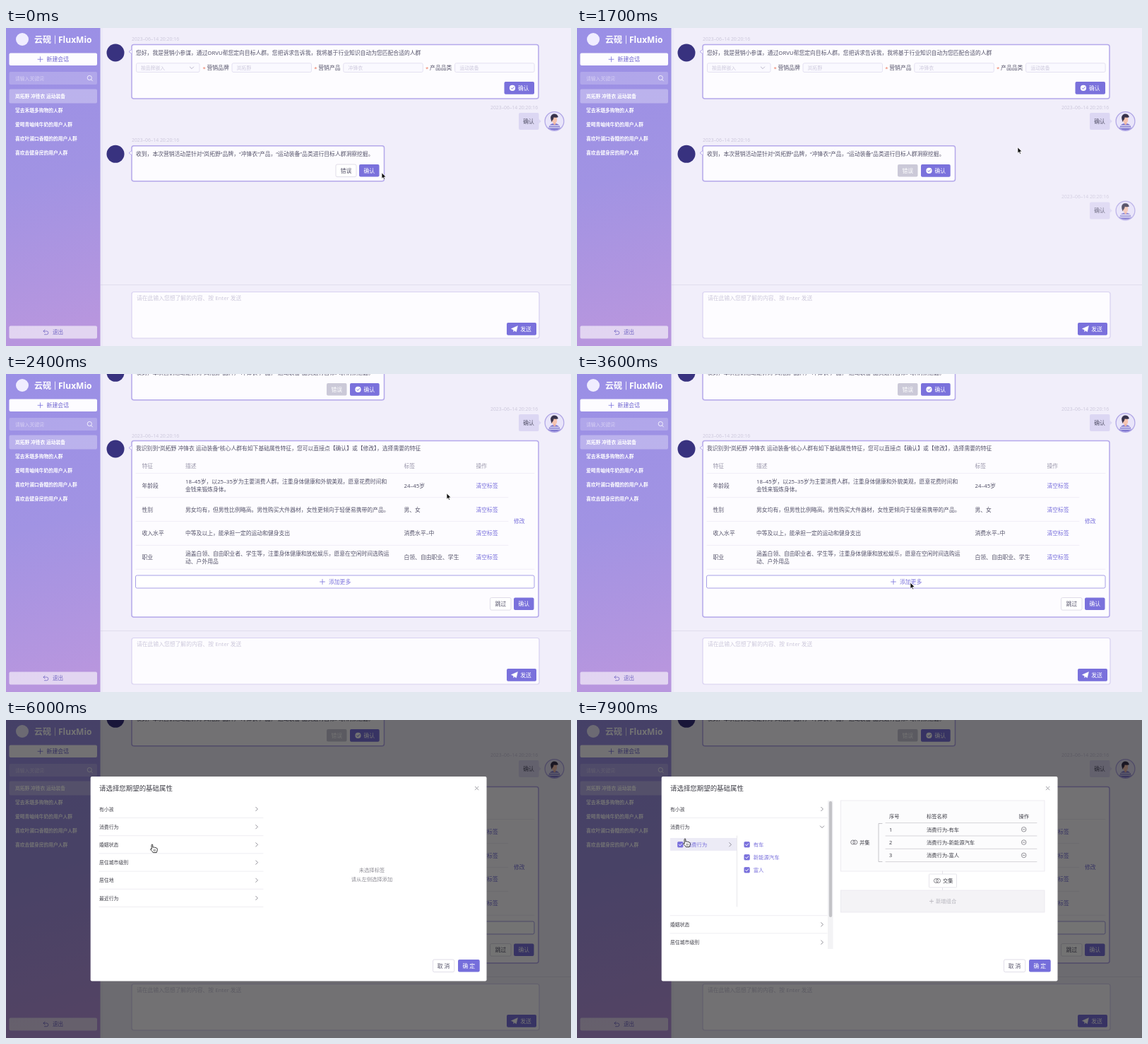
An HTML page that plays this animation: 800x450 px, repeating every 8000 ms.

```html
<!DOCTYPE html>
<html lang="zh-CN">
<head>
<meta charset="utf-8">
<title>会话</title>
<style>
html, body { margin: 0; height: 100%; overflow: hidden; background: #f1eefa; }
svg { display: block; width: 100vw; height: 100vh; font-family: "Noto Sans", "Noto Sans CJK SC", "Noto Sans CJK", sans-serif; }
</style>
</head>
<body>
<svg id="stage" viewBox="0 0 800 450"></svg>
<script>
const INK = '#55536a', PURPLE = '#7a71dc', PALE = '#cdc9dc', DARK = '#3f3f48';
const BRAND = '岚拓野';

// Drawing helpers; text y is the vertical centre of the line
const text = (x, y, s, size = 7.8, fill = INK, extra = '') =>
  `<text x="${x}" y="${y + size * .37}" font-size="${size}" fill="${fill}" ${extra}>${s}</text>`;
const mid = (x, y, s, size, fill, extra = '') => text(x, y, s, size, fill, `text-anchor="middle" ${extra}`);
const rect = (x, y, x2, y2, fill, stroke = 'none', r = 2, w = .8) =>
  `<rect x="${x}" y="${y}" width="${x2 - x}" height="${y2 - y}" rx="${r}" fill="${fill}" stroke="${stroke}" stroke-width="${w}"/>`;
const path = (d, stroke, w = .8, fill = 'none') =>
  `<path d="${d}" fill="${fill}" stroke="${stroke}" stroke-width="${w}" stroke-linecap="round" stroke-linejoin="round"/>`;
const circle = (x, y, r, fill, stroke = 'none', w = .8) =>
  `<circle cx="${x}" cy="${y}" r="${r}" fill="${fill}" stroke="${stroke}" stroke-width="${w}"/>`;
const group = (id, s, extra = '') => `<g id="${id}" ${extra}>${s}</g>`;
const hline = (x, y, x2, color, w = .7) => path(`M${x} ${y}H${x2}`, color, w);
const plus = (x, y, color, r = 3.5) => path(`M${x - r} ${y}h${2 * r}M${x} ${y - r}v${2 * r}`, color);
const chevron = (x, y, color = '#77757f', turn = 0) =>
  `<g transform="translate(${x} ${y}) rotate(${turn})">${path('M-1.3 -2.7L1.4 0L-1.3 2.7', color)}</g>`;

const button = (x, y, x2, label, fill = PURPLE, color = '#fff', stroke = 'none') =>
  rect(x, y, x2, y + 17.6, fill, stroke) + mid((x + x2) / 2, y + 8.8, label, 7.8, color);
const plain = (x, y, x2, label) => button(x, y, x2, label, '#fff', INK, '#d8d5e3');
const checked = (x, y, x2) => rect(x, y, x2, y + 17.8, PURPLE) + circle(x + 11.5, y + 8.9, 4.1, '#fff') +
  path(`M${x + 9.7} ${y + 9}l1.4 1.4l2.5 -2.8`, PURPLE, 1) + text(x + 19.5, y + 8.9, '确认', 7.8, '#fff');
const tick = (x, y, on) => rect(x - 3.7, y - 3.7, x + 3.7, y + 3.7, on ? PURPLE : '#fff', on ? PURPLE : '#cfcfd6', 1) +
  (on ? path(`M${x - 1.9} ${y}l1.5 1.6l2.5 -3`, '#fff', 1) : '');
const rings = (x, y) => circle(x - 1.6, y, 3, 'none', '#66656d') + circle(x + 1.6, y, 3, 'none', '#66656d');

const stamp = (x, y) => text(x, y, '2023–06–14 20:20:16', 6.85, PALE);
const card = (x2, y, y2) => circle(155, y + 11.5, 12.5, '#38327f') +
  rect(178, y, x2, y2, '#fdfcff', '#b4a8ea', 3, 1.5) +
  path(`M178 ${y + 7}l-4 3l4 3`, '#b4a8ea', 1, '#fdfcff');

const user = y => `<g transform="translate(776.5 ${y})">` + circle(0, 0, 13.4, '#e9e5fa', '#b1a7e6', 1.3) +
  path('M-8 10Q-7 3 0 3Q7 3 8 10Q0 15 -8 10Z', '#8078cf', .4, '#8078cf') +
  path('M-6 6.2H6M-7 9H7', '#fff', 1.1) +
  rect(-1.6, 0, 2, 5, '#efb6a1') + rect(-3.6, -7.5, 3.6, 2, '#f6c4b0', 'none', 3.2) +
  path('M-4 0Q-7 -8 -2 -10Q4 -11 5 -6Q2 -5 -1 -6Q-1 -3 -4 0Z', '#37324c', .5, '#37324c') + '</g>';
const reply = y => stamp(686, y - 19.5) + rect(726, y - 12, 754.5, y + 12, '#dcd7f3') +
  path(`M754.5 ${y - 3}l3 3l-3 3Z`, '#dcd7f3', .3, '#dcd7f3') + mid(740, y, '确认') + user(y);

function sidebar() {
  const items = [`${BRAND} 冲锋衣 运动装备`, '常去禾璐多购物的人群', '爱喝青岫纯牛奶的用户人群',
    '喜欢叶澜口香糖的的用户人群', '喜欢去健身房的用户人群'];
  return rect(0, 0, 133.5, 450, 'url(#side)', 'none', 0) + rect(133.5, 0, 137, 450, '#5a4a9008', 'none', 0) +
    circle(23, 16, 9, '#f0edff') + text(40, 16.3, '云砚', 12, '#fff', 'font-weight="600"') +
    path('M69.5 11v11', '#fff') + text(74, 16.5, 'FluxMio', 12, '#fff', 'font-weight="600"') +
    rect(4.5, 35.5, 129, 53, '#fdfcff') + plus(48.5, 44.3, PURPLE) + text(57.5, 44.2, '新建会话', 7.9, '#6c62cf') +
    rect(4.5, 62, 129, 80, '#ffffff33') + text(13, 71, '请输入关键词', 6.8, '#d5cef3') +
    circle(118.3, 70.5, 3.1, 'none', '#fff') + path('M120.6 73l1.9 1.9', '#fff') +
    rect(4.5, 86.5, 129, 106.5, '#ffffff4d') +
    items.map((s, i) => text(13, 97 + i * 20, s, 6.75, '#fff', 'font-weight="600"')).join('') +
    rect(4.5, 421.5, 129, 439.5, '#ffffff99') + text(66, 430.6, '退出', 7.6, '#7468c4') +
    path('M55 427l-2 2l2 2M53 429h4.5a2.3 2.3 0 0 1 0 4.7h-3', '#7468c4');
}

function form() {
  const fields = [['营销品牌', BRAND], ['营销产品', '冲锋衣'], ['产品品类', '运动装备']];
  return stamp(178, 15.5) + card(754, 23.5, 100) +
    text(184, 35, '您好，我是营销小参谋，通过ORVU帮您定向目标人群。您把诉求告诉我，我将基于行业知识自动为您匹配合适的人群') +
    rect(184.5, 49.8, 274, 62.5, '#faf9ff', '#dfdbee') + text(191, 56.3, '按品牌嵌入', 6.8, PALE) +
    chevron(263, 56.3, '#aaa6bd', 90) +
    fields.map(([label, value], i) => {
      const x = 320 + i * 157.8;
      return text(x - 41.5, 57.3, '*', 7.8, '#ee7c62') + text(x - 35.5, 56.3, label) +
        rect(x, 49.8, x + 112.5, 62.5, '#faf9ff', '#dfdbee') + text(x + 6.8, 56.3, value, 6.8, PALE);
    }).join('') + checked(705.5, 76, 748);
}

const confirmCard = () => stamp(178, 158.5) + card(535.5, 166.8, 216.8) +
  text(184, 178.5, `收到，本次营销活动是针对“${BRAND}”品牌，“冲锋衣”产品，“运动装备”品类进行目标人群洞察挖掘。`) +
  group('ask', plain(467, 193, 496, '错误') + button(500, 193, 528.5, '确认')) +
  group('done', button(454, 193, 482.5, '错误', '#cbc9d8') + checked(487, 193, 528.7));

function table() {
  const cols = [192.5, 254, 563.5, 665.5];
  const rows = [
    ['年龄段', '18–45岁，以25–35岁为主要消费人群。注重身体健康和外貌美观，愿意花费时间和|金钱来锻炼身体。', '24–45岁'],
    ['性别', '男女均有，但男性比例略高。男性购买大件器材，女性更倾向于轻便易携带的产品。', '男、女'],
    ['收入水平', '中等及以上，能承担一定的运动和健身支出', '消费水平–中'],
    ['职业', '涵盖白领、自由职业者、学生等，注重身体健康和放松娱乐，愿意在空闲时间选购运|动、户外用品', '白领、自由职业、学生']];
  return stamp(178, 87) + card(754, 94.5, 344) +
    text(184, 105.5, `我识别到“${BRAND} 冲锋衣 运动装备”核心人群有如下基础属性特征，您可以直接点【确认】或【修改】，选择需要的特征`) +
    ['特征', '描述', '标签', '操作'].map((s, i) => text(cols[i], 130, s, 7.8, '#9a97ab')).join('') +
    hline(184, 140.5, 748, '#ece9f4') +
    rows.map(([name, about, tag], i) => {
      const y = 157.8 + i * 33.9, lines = about.split('|');
      return text(cols[0], y, name) +
        lines.map((s, j) => text(cols[1], y + (j - (lines.length - 1) / 2) * 11, s)).join('') +
        text(cols[2], y, tag) + text(cols[3], y, '清空标签', 7.8, PURPLE) +
        hline(184, y + 16.8, i < 3 ? 711 : 748, '#ece9f4');
    }).join('') + text(719, 208.5, '修改', 7.8, PURPLE) +
    rect(183.5, 285, 748, 303, '#fff', '#a79fe6', 2, 1) + plus(448, 294, PURPLE) + text(457, 294, '添加更多', 7.8, PURPLE) +
    plain(685.5, 316.5, 715, '跳过') + button(719, 316.5, 747.5, '确认');
}

const composer = () => rect(134, 363.5, 800, 450, '#f1eefa', 'none', 0) + hline(134, 363.5, 800, '#dcd8e8') +
  rect(178, 373.5, 755, 439, '#fdfcff', '#d8d1f0', 3, 1.2) +
  text(185, 382.3, '请在此输入您想了解的内容、按 Enter 发送', 7.8, PALE) +
  rect(709, 417, 751, 434.8, PURPLE) + path('M715.5 425.5L724.5 421.5L722.5 430L719.7 428L718.8 430L718.4 427.2Z', '#fff', .4, '#fff') +
  text(728.3, 426, '发送', 7.8, '#fff');

function submenu(on) {
  const color = on ? PURPLE : DARK;
  return rect(132, 167, 226, 185, '#ecebf6', 'none', 0) + tick(146.3, 176.3, on) + text(155, 176.3, '消费行为', 7.3, color) +
    chevron(217, 176.3) + path('M226.5 164v100', '#e3e2e8') +
    group(on ? 'kidsOn' : 'kidsOff', ['有车', '新能源汽车', '富人'].map((s, i) =>
      tick(240.6, 176.3 + i * 18, on) + text(249.7, 176.3 + i * 18, s, 7.4, color)).join(''));
}

function picker() {
  const row = (s, i) => text(132, 126 + i * 25.2, s, 6.85, DARK) +
    `<g class="arrow">${i == 1 ? group('fold', path('M-1.3 -2.7L1.4 0L-1.3 2.7', '#77757f')) : chevron(355, 126 + i * 25.2)}</g>`;
  const line = i => hline(132, 138.5 + i * 25.2, 364, '#e8e7ed');
  const rest = ['婚姻状态', '居住城市级别', '居住地', '最近行为'];
  return row('有小孩', 0) + line(0) + row('消费行为', 1) + group('off', submenu(false)) + group('on', submenu(true)) +
    group('rest', rect(130, 163.4, 366, 400, '#fff', 'none', 0) + line(1) + rest.map((s, i) => row(s, i + 2) + line(i + 2)).join('')) +
    group('bar', rect(354.5, 113, 366, 324, '#fff', 'none', 0) + rect(355, 114, 362.5, 324, '#f3f3f5', 'none', 0) +
      rect(356.8, 115, 361.2, 279, '#c3c3c7', 'none', 2.2));
}

function result() {
  const rows = ['有车', '新能源汽车', '富人'];
  return rect(373.5, 114, 662, 214, '#fcfcfd', '#e8e7ed', 0) +
    text(442, 136, '序号', 7.3, DARK) + text(495, 136, '标签名称', 7.3, DARK) + text(625.5, 136, '操作', 7.3, DARK) +
    hline(437, 145.6, 651, '#c6c5cb') +
    rows.map((s, i) => {
      const y = 154.8 + i * 18.3;
      return text(442, y, i + 1, 7.3, DARK) + text(495, y, '消费行为-' + s, 7.3, DARK) +
        circle(632.7, y, 3.3, 'none', '#66656d', .7) + hline(631.2, y, 634.2, '#66656d') + hline(437, y + 9.2, 651, '#c6c5cb');
    }).join('') +
    path('M432 146.5H427V200.5H432', '#b9b8be') + rings(392.3, 173) + text(400, 173, '并集', 7.3, DARK) +
    path('M517.5 214v27', '#dddce4') + rect(498.5, 218, 537.5, 237, '#fff', '#e0dfe6', 1) + rings(510, 227.5) + text(518, 227.5, '交集', 7.3, DARK) +
    rect(373.5, 241, 662, 272, '#f4f3f6', '#e8e7ed', 0) + plus(502, 256.5, '#b5b4bc', 2.6) + text(508, 256.5, '新增组合', 7.3, '#b5b4bc');
}

const modal = () => rect(119.7, 80, 680.5, 369.5, '#fff') + text(132, 96.5, '请选择您期望的基础属性', 9.45, DARK) +
  path('M664.3 94.3l4.6 4.6m0 -4.6l-4.6 4.6', '#8a8991') +
  `<g clip-path="url(#listClip)">${picker()}</g>` +
  group('empty', mid(518, 212.5, '未选择标签', 7.3, '#8f8e96') + mid(518, 225, '请从左侧选择添加', 7.3, '#8f8e96')) +
  group('result', result()) +
  plain(604.5, 339, 634.7, '取 消') + button(640, 339, 670.7, '确 定', '#756edb');

document.getElementById('stage').innerHTML =
  `<defs><linearGradient id="side" x1="0" y1="0" x2=".08" y2="1">
    <stop offset="0" stop-color="#9a8fe6"/><stop offset=".5" stop-color="#a193e3"/><stop offset="1" stop-color="#b896de"/></linearGradient>
    <clipPath id="chatClip"><rect x="134" width="666" height="363.5"/></clipPath>
    <clipPath id="listClip"><rect x="125" y="113" width="242" height="211"/></clipPath></defs>` +
  rect(0, 0, 800, 450, '#f1eefa', 'none', 0) +
  `<g clip-path="url(#chatClip)">${group('chat', form() + reply(132) + confirmCard() + group('answer', reply(249)) + group('table', table()))}</g>` +
  composer() + sidebar() + group('mask', rect(0, 0, 800, 450, '#000', 'none', 0)) + group('modal', modal()) +
  group('arrow', path('M0 0V8.2L1.9 6.5L3.2 9.3L4.5 8.7L3.3 6L5.8 5.8Z', '#fff', .7, '#111')) +
  group('hand', path('M0 1Q0 0 .9 0Q1.8 0 1.8 1V4.2Q4 3.6 4.6 4.4Q6.5 4.2 6.8 5.2Q8.4 5.2 8.3 6.6Q8.3 9 7.2 11.6H2.2Q1 9.5 -1.4 7.4Q-1.6 6.2 -.3 6.4L0 6.8Z', '#222', .9, '#fff') +
    path('M3.4 7v2.6M5.2 7v2.6', '#222', .6));

const el = id => document.getElementById(id);
const show = (id, on) => el(id).setAttribute('display', on ? 'inline' : 'none');
const move = (id, x, y, more = '') => el(id).setAttribute('transform', `translate(${x} ${y}) ${more}`);
const fade = (id, a) => el(id).setAttribute('opacity', a);
const ramp = (t, from, to) => Math.min(1, Math.max(0, (t - from) / (to - from)));
const easeOut = p => 1 - (1 - p) ** 3;
const easeBoth = p => p * p * (3 - 2 * p);

// Pointer stops: time, x, y
const stops = [[0, 532, 205], [350, 515, 202], [900, 515, 202], [1500, 624, 169], [2700, 624, 169], [3500, 472, 295.5],
  [5450, 472, 295.5], [5950, 206, 176], [6350, 206, 176], [6550, 190, 150], [6850, 190, 150], [7200, 152, 168], [8000, 152, 168]];
function pointer(t) {
  const i = stops.findIndex((s, n) => n && t < s[0]);
  const [t0, x0, y0] = stops[i - 1], [t1, x1, y1] = stops[i];
  const p = easeBoth(ramp(t, t0, t1));
  return [x0 + (x1 - x0) * p, y0 + (y1 - y0) * p];
}

function draw(now) {
  const t = now % 8000;
  show('ask', t < 700);
  show('done', t >= 700);

  const sent = ramp(t, 1500, 1900);
  fade('answer', Math.min(1, sent * 1.6));
  move('answer', 0, 19 * (1 - sent));

  const arrive = easeOut(ramp(t, 1900, 2300));
  move('chat', 0, -180 * arrive);
  move('table', -16 * (1 - arrive), 180);
  fade('table', arrive);

  const pop = easeOut(ramp(t, 4450, 4680)), scale = .2 + .8 * pop;
  fade('mask', .55 * pop);
  fade('modal', pop);
  show('modal', pop > 0);
  move('modal', 472 * (1 - scale), 296 * (1 - scale), `scale(${scale})`);

  const open = easeBoth(ramp(t, 6600, 6850)), picked = t >= 7400, scrolls = open > .52;
  move('rest', 0, 113 * open);
  move('fold', 355, 151.2, `rotate(${90 * open})`);
  document.querySelectorAll('.arrow').forEach(a => a.setAttribute('transform', `translate(${scrolls ? -8 : 0} 0)`));
  show('bar', scrolls);
  show('off', open > 0 && !picked);
  show('on', picked);
  show('kidsOff', t >= 7100);
  show('empty', !picked);
  show('result', picked);

  const [x, y] = pointer(t);
  move('arrow', x, y);
  move('hand', x, y);
  show('arrow', t < 4500);
  show('hand', t >= 5450);
}

function loop() {
  draw(performance.now());
  requestAnimationFrame(loop);
}
loop();
</script>
</body>
</html>
```
